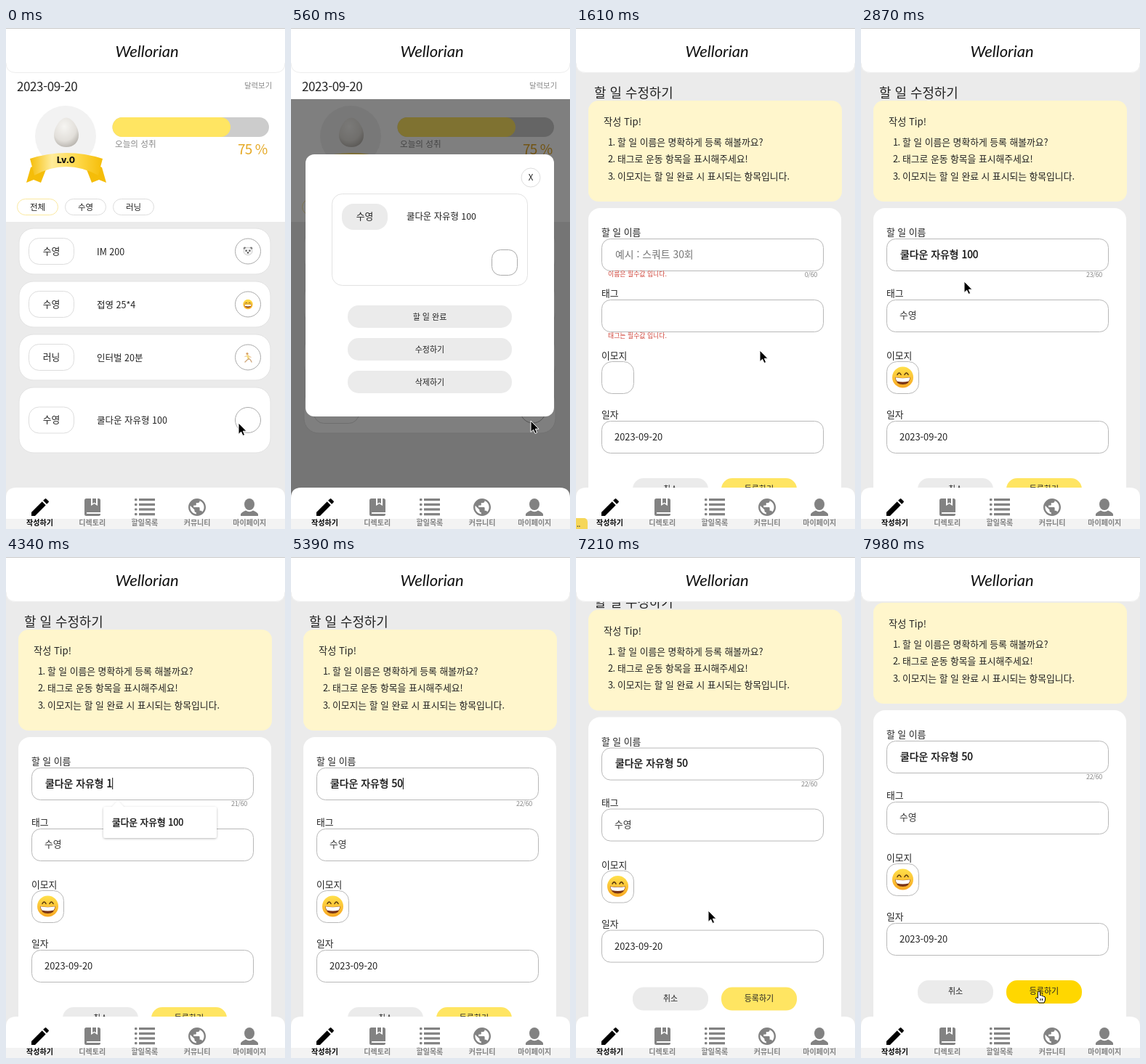
Animation, 384 px wide and 690 px high, one loop 8 s. Source, as an HTML page:

```html
<!DOCTYPE html>
<html lang="ko">
<head>
<meta charset="utf-8">
<style>
html, body { margin: 0; width: 100%; height: 100%; overflow: hidden; background: #fff; }
svg { display: block; width: 384px; height: 690px; }
text { font-family: "Noto Sans CJK KR", "Noto Sans CJK", "Noto Sans", sans-serif; white-space: pre; }
</style>
</head>
<body>
<svg id="stage" viewBox="0 0 384 690" xmlns="http://www.w3.org/2000/svg"></svg>
<script>
const LOOP = 8000, STEP = 70;
const stage = document.getElementById('stage');

// Markup helpers
const rect = (x, y, w, h, r, fill, stroke = 'none', extra = '') =>
  `<rect x="${x}" y="${y}" width="${w}" height="${h}" rx="${r}" fill="${fill}" stroke="${stroke}" ${extra}/>`;
const circle = (x, y, r, fill, stroke = 'none') =>
  `<circle cx="${x}" cy="${y}" r="${r}" fill="${fill}" stroke="${stroke}"/>`;
const text = (x, y, size, str, fill = '#222', extra = '') =>
  `<text x="${x}" y="${y}" font-size="${size}" fill="${fill}" ${extra}>${str}</text>`;
const mid = (x, y, size, str, fill = '#222', extra = '') =>
  text(x, y, size, str, fill, 'text-anchor="middle" ' + extra);
const path = (d, fill, extra = '') => `<path d="${d}" fill="${fill}" ${extra}/>`;
const use = (id, x, y, s = 1) => `<use href="#${id}" transform="translate(${x} ${y}) scale(${s})"/>`;
const group = (id, body) => `<g id="${id}">${body}</g>`;

const defs = `<defs>
  <radialGradient id="egg" cx=".42" cy=".3" r=".75">
    <stop offset="0" stop-color="#f6f5f2"/><stop offset=".65" stop-color="#e2dfda"/><stop offset="1" stop-color="#b5b1ab"/>
  </radialGradient>
  <linearGradient id="gold">
    <stop offset="0" stop-color="#f5bd08"/><stop offset=".3" stop-color="#ffec9a"/>
    <stop offset=".65" stop-color="#ffd94a"/><stop offset="1" stop-color="#f5bd08"/>
  </linearGradient>
  <linearGradient id="face" x2="0" y2="1">
    <stop offset="0" stop-color="#ffe04a"/><stop offset="1" stop-color="#f8a823"/>
  </linearGradient>
  <filter id="soft" x="-20%" y="-20%" width="140%" height="150%">
    <feDropShadow dx="0" dy="1" stdDeviation="1.5" flood-opacity=".28"/>
  </filter>
  <g id="smile">
    ${circle(0, 0, 14.5, 'url(#face)')}
    ${path('M-7.500 -3.500Q-5 -8.500 -2.500 -3.500M2.500 -3.500Q5 -8.500 7.500 -3.500', 'none', 'stroke="#5a3a10" stroke-width="1.6" stroke-linecap="round"')}
    ${path('M-10.500 0Q0 2 10.500 0Q9.500 10 0 10T-10.500 0Z', '#7a3516')}
    ${path('M-10 .3Q0 2.200 10 .3Q9.500 4 8 5.500Q0 7.500 -8 5.500Q-9.500 4 -10 .3Z', '#fff')}
  </g>
  <g id="panda">
    ${circle(-4.3, -4, 1.9, '#777')}${circle(4.3, -4, 1.9, '#777')}
    <ellipse rx="6" ry="5.3" fill="#f4f4f4" stroke="#bbb" stroke-width=".7"/>
    ${circle(-2.4, -.8, 1.2, '#555')}${circle(2.4, -.8, 1.2, '#555')}
    <ellipse cy="2" rx="1.300" ry=".9" fill="#333"/>
  </g>
  <g id="runner" fill="none" stroke-linecap="round" stroke-linejoin="round">
    ${circle(-1, -5, 1.6, '#d9a066')}
    ${path('M-4 -1L0 -2.4L4 0', 'none', 'stroke="#ecc79c" stroke-width="1.3"')}
    ${path('M-.5 -2L1 2', 'none', 'stroke="#f6dc80" stroke-width="2.8"')}
    ${path('M1 2L-1.5 4L-4 6.5M1 2L3.5 3.5L5 6.5', 'none', 'stroke="#cfa77c" stroke-width="1.4"')}
  </g>
</defs>`;

// Day view with the task cards
function card(y, h, tag, title, mark) {
  const c = y + h / 2;
  return rect(18, y, 346, h, 20, '#fff', '#e3e3e3') +
    rect(31.5, c - 18, 62, 36, 14, '#fff', '#ddd') + mid(62.5, c + 4, 12.8, tag) +
    text(125, c + 5, 12.5, title) + circle(333, c, 17.5, '#fff', '#aaa') +
    (mark ? use(mark, 333, c, mark == 'smile' ? .46 : 1) : '');
}
const lastCard = h => card(495, h, '수영', '쿨다운 자유형 100', '');
const chip = (x, label, stroke) =>
  rect(x + .5, 235.5, 56, 22, 11, '#fff', stroke) + mid(x + 28.5, 250.5, 11.5, label);
const tail = 'M42 188L34 192L28 213L38 209L48 213L55 195Z';
const day = group('day',
  rect(0, 0, 384, 267, 0, '#fff') + rect(0, 267, 384, 423, 0, '#ebebeb') +
  text(15, 87, 17, '2023-09-20', '#222', 'letter-spacing="-.4"') +
  text(328, 83, 10.4, '달력보기', '#888') +
  circle(82, 149, 42, '#f2f2f2') +
  path('M83 123.5C91 123.5 100 137 100 147.5S92.500 164 83 164S66 158 66 147.500S75 123.500 83 123.500Z', 'url(#egg)') +
  path(tail, '#f5bd08') + path(tail, '#f5bd08', 'transform="matrix(-1 0 0 1 166 0)"') +
  path('M33 180Q83 164 133 180L127 203Q83 179 39 203Z', 'url(#gold)') +
  mid(82.5, 186, 12, 'Lv.0', '#111', 'font-weight="800" style="font-family:Inter,sans-serif"') +
  rect(146.5, 123, 215.5, 27, 13.5, '#ccc') + rect(146.5, 123, 162.5, 27, 13.5, '#ffe562') +
  text(150, 164, 11.6, '오늘의 성취', '#888') +
  text(319, 174, 19, '75 %', '#e5a823', 'letter-spacing="-.9"') +
  chip(15, '전체', '#fbe9a0') + chip(81, '수영', '#ddd') + chip(147, '러닝', '#ddd') +
  card(276, 63, '수영', 'IM 200', 'panda') + card(349, 63, '수영', '접영 25*4', 'smile') +
  card(422, 63, '러닝', '인터벌 20분', 'runner') +
  group('tall', lastCard(90)) + group('short', lastCard(63)));

// Task dialog
const action = (y, label, id) =>
  rect(78, y, 226, 31, 15, '#ebebeb', 'none', `id="${id}"`) + mid(191, y + 19.5, 11, label);
const modal = group('modal',
  rect(0, 98, 384, 592, 0, '#000', 'none', 'opacity=".5"') +
  rect(20, 174, 342, 361, 12, '#fff') +
  circle(330, 206, 13, '#fff', '#ddd') + mid(330, 210, 11.5, 'X') +
  rect(56.5, 228.5, 269, 126, 14, '#fff', '#e2e2e2') +
  rect(70, 242, 63, 36, 16, '#ebebeb') + mid(101.5, 263.5, 12.8, '수영') +
  text(159, 264, 12.4, '쿨다운 자유형 100') +
  rect(276.5, 305.5, 35, 35, 12, '#fff', '#aaa') +
  action(382, '할 일 완료', 'done') + action(427, '수정하기', 'edit') + action(472, '삭제하기', 'drop'));

// Edit form
const field = (y, label) =>
  text(35, y - 4, 12.8, label) + rect(35.5, y + .5, 305, 44, 12, '#fff', '#b8b8b8');
const tips = ['할 일 이름은 명확하게 등록 해볼까요?', '태그로 운동 항목을 표시해주세요!', '이모지는 할 일 완료 시 표시되는 항목입니다.'];
const red = '#d0453a', medium = 'stroke="#111" stroke-width=".35"';
const form = group('form', rect(0, 0, 384, 690, 0, '#ebebeb') + group('page',
  text(25, 96, 17.9, '할 일 수정하기', '#222') +
  rect(17, 100, 349, 139, 14, '#fff6cc') + text(38, 134, 13.2, '작성 Tip!') +
  tips.map((s, i) => text(44, 162 + 23.3 * i, 12.8, i + 1 + '.', '#222', 'letter-spacing="-.5"') +
    text(57, 162 + 23.3 * i, 12.8, s)).join('') +
  rect(17, 248, 348, 520, 16, '#fff') +
  field(290, '할 일 이름') + field(374, '태그') + field(541, '일자') +
  text(54, 316.5, 13.9, '', '#111', 'id="name" stroke-width=".35"') +
  rect(0, 304, 1, 16, 0, '#111', 'none', 'id="caret"') +
  text(332, 343, 9, '', '#888', 'id="count" text-anchor="end" letter-spacing="-.3"') +
  text(35, 456, 12.8, '이모지') + rect(35.5, 459.5, 44, 44, 14, '#fff', '#b8b8b8') +
  text(53, 568, 12.9, '2023-09-20') +
  group('errors', text(44, 342, 8.9, '이름은 필수값 입니다.', red) + text(44, 427, 8.9, '태그는 필수값 입니다.', red)) +
  group('filled', text(53, 400, 12.8, '수영', '#333') + use('smile', 57.5, 481)) +
  rect(78, 620, 104, 32, 15, '#ebebeb') + mid(130, 639, 11, '취소') +
  rect(200, 620, 104, 32, 15, '#ffe562', 'none', 'id="save"') + mid(252, 639, 11, '등록하기') +
  group('popup', path('M137 344H146L154 335.500L162 344H287Q290 344 290 347V384Q290 387 287 387H137Q134 387 134 384V347Q134 344 137 344Z', '#fff', 'filter="url(#soft)"') +
    text(146, 370, 12.7, '쿨다운 자유형 100', '#111', medium))));

// Fixed header and tab bar
const tabs = ['작성하기', '디렉토리', '할일목록', '커뮤니티', '마이페이지'];
const gray = '#828282';
const icon = (x, y, s, fill, d) => path(d, fill, `transform="translate(${x} ${y}) scale(${s})"`);
const bars = path('M0 0H384V48Q384 62 370 62H14Q0 62 0 48Z', '#fff') +
  path('M0 48Q0 61.500 14 61.500H370Q384 61.500 384 48', 'none', 'stroke="#ededed"') +
  rect(0, 0, 384, 1, 0, '#c8c8c8') +
  mid(194, 40, 22, 'Wellorian', '#111', 'font-style="italic" style="font-family:Lato,sans-serif"') +
  path('M0 690V647Q0 633 14 633H370Q384 633 384 647V690Z', '#fff') +
  rect(0, 676, 384, 14, 0, '#f3f3f3') +
  icon(31, 644, 1.33, '#000', 'M3 17.25V21h3.75L17.81 9.94l-3.75-3.75zM20.71 7.04a1 1 0 0 0 0-1.41l-2.34-2.34a1 1 0 0 0-1.41 0l-1.83 1.83 3.75 3.75z') +
  rect(108, 648, 22, 24, 2.5, gray) + path('M117 648H126V658L121.500 655L117 658Z', '#fff') +
  path('M119 648H124V655L121.500 653.500L119 655Z', gray) + rect(111, 667, 19, 2, 0, '#fff') +
  [0, 1, 2, 3].map(i => rect(177, 648 + 6.7 * i, 3.5, 3.2, 1, gray) + rect(183, 648 + 6.7 * i, 22, 3.2, 0, gray)).join('') +
  icon(248.6, 645.6, 1.2, gray, 'M12 2C6.480 2 2 6.480 2 12s4.480 10 10 10 10-4.480 10-10S17.520 2 12 2zm-1 17.930c-3.950-.490-7-3.850-7-7.930 0-.620.080-1.210.210-1.790L9 15v1c0 1.100.900 2 2 2zm6.900-2.540c-.260-.810-1-1.390-1.900-1.390h-1v-3c0-.550-.450-1-1-1H8v-2h2c.550 0 1-.450 1-1V7h2c1.100 0 2-.900 2-2v-.410c2.930 1.190 5 4.060 5 7.410 0 2.080-.800 3.970-2.100 5.390z') +
  '<ellipse cx="335" cy="656" rx="7" ry="8" fill="' + gray + '"/>' +
  path('M323 672V669.500Q324 667 330 664.500Q335 668 340 664.500Q346 667 347 669.500V672Z', gray) +
  tabs.map((s, i) => mid(46.5 + 72.2 * i, 685, 10, s, i ? gray : '#000', 'font-weight="700"')).join('') +
  group('corner', path('M0 675H12Q16 676 16 681V690H0Z', '#f5d659') + text(1, 687, 8, '..', '#333', 'font-weight="700"'));

const pointer = group('cursor',
  path('M0 0V15.500L3.600 12.200L6 17.500L8.600 16.400L6.300 11.200H11Z', '#000', 'id="arrow" stroke="#fff"') +
  path('M-3 -8Q0 -8 0 -6Q0 -8 3 -8M0 -6V6M-3 8Q0 8 0 6Q0 8 3 8', 'none', 'id="beam" stroke="#222" stroke-width="1.300"') +
  path('M-1.500 1.500Q0 -1 1.500 1.500V6Q3 4.500 4 6.500Q5.500 5.500 6.500 7.500Q8.500 7 8.500 9V12Q8 14 7 16H0Q-2 13 -4.500 10Q-4.500 7.500 -1.500 9.500Z M2 10V13M4.500 10V13', '#fff', 'id="hand" stroke="#000"'));

stage.innerHTML = defs + day + modal + form + bars + pointer;
const el = {};
stage.querySelectorAll('[id]').forEach(n => el[n.id] = n);

// Pointer path: time, x, y
const track = [
  [0, 320, 544], [140, 330, 541], [910, 330, 541], [1400, 253, 444], [1890, 253, 444],
  [2380, 171, 446], [2520, 171, 446], [2870, 142, 349], [3010, 130, 312], [3150, 169, 306],
  [3360, 169, 306], [3570, 169, 337], [3780, 167, 340], [5740, 167, 340], [6230, 182, 487],
  [7210, 182, 487], [7770, 245, 598], [LOOP, 245, 598]
];
// Value of the name field: start time, text, counter
const typed = [
  [0, '', 0], [1680, '쿨다운 자유형 100', 23], [4060, '쿨다운 자유형 10', 22], [4270, '쿨다운 자유형 1', 21],
  [4550, '쿨다운 자유형 ', 20], [5180, '쿨다운 자유형 5', 21], [5390, '쿨다운 자유형 50', 22]
];
const clamp = v => Math.max(0, Math.min(1, v));
const ease = v => v * v * (3 - 2 * v);
const ramp = (t, a, b) => clamp((t - a) / (b - a));
const within = (t, a, b) => t >= a && t < b;
const show = (node, on) => node.setAttribute('display', on ? 'inline' : 'none');

function position(t) {
  const i = Math.max(1, track.findIndex(k => k[0] >= t));
  const [t0, x0, y0] = track[i - 1], [t1, x1, y1] = track[i];
  const k = ease(ramp(t, t0, t1));
  return [x0 + (x1 - x0) * k, y0 + (y1 - y0) * k];
}

function draw(ms) {
  const t = Math.floor(ms / STEP) * STEP;
  const opened = t >= 560, editing = t >= 1610;
  show(el.day, !editing);
  show(el.tall, !opened);
  show(el.short, opened);
  show(el.modal, opened && !editing);
  show(el.form, editing);
  show(el.corner, within(t, 1610, 2030));

  const [, value, count] = typed.filter(k => t >= k[0]).pop();
  const loaded = t >= 1680;
  el.name.textContent = value || '예시 : 스쿼트 30회';
  el.name.setAttribute('fill', loaded ? '#111' : '#757575');
  el.name.setAttribute('stroke', loaded ? '#111' : 'none');
  el.count.textContent = count + '/60';
  show(el.errors, !loaded);
  show(el.filled, loaded);

  const blink = within(t, 3290, 3780) || within(t, 4060, 4830) || within(t, 5180, 5810);
  show(el.caret, blink);
  if (blink) el.caret.setAttribute('x', 54 + el.name.getComputedTextLength());
  show(el.popup, within(t, 4060, 5250));
  el.popup.setAttribute('opacity', t == 4060 || t == 5180 ? .5 : 1);

  const scroll = 37 * ease(ramp(t, 6930, 7350));
  el.page.setAttribute('transform', `translate(0 ${-scroll})`);
  const glow = ramp(t, 7630, 7840);
  el.save.setAttribute('fill', `rgb(255 ${229 - 14 * glow} ${98 * (1 - glow)})`);

  const [x, y] = position(t);
  const onEdit = opened && !editing && within(x, 78, 304) && within(y, 427, 458);
  const onSave = editing && x > 200 && y > 583;
  const onName = editing && within(y, 290, 334) && within(x, 35, 341);
  el.edit.setAttribute('fill', onEdit ? '#d8d8d8' : '#ebebeb');
  el.cursor.setAttribute('transform', `translate(${x} ${y})`);
  show(el.cursor, !within(t, 4060, 5810));
  show(el.hand, onEdit || onSave);
  show(el.beam, onName);
  show(el.arrow, !onEdit && !onSave && !onName);
}

const start = performance.now();
function tick() {
  draw((performance.now() - start) % LOOP);
  requestAnimationFrame(tick);
}
tick();
</script>
</body>
</html>
```
